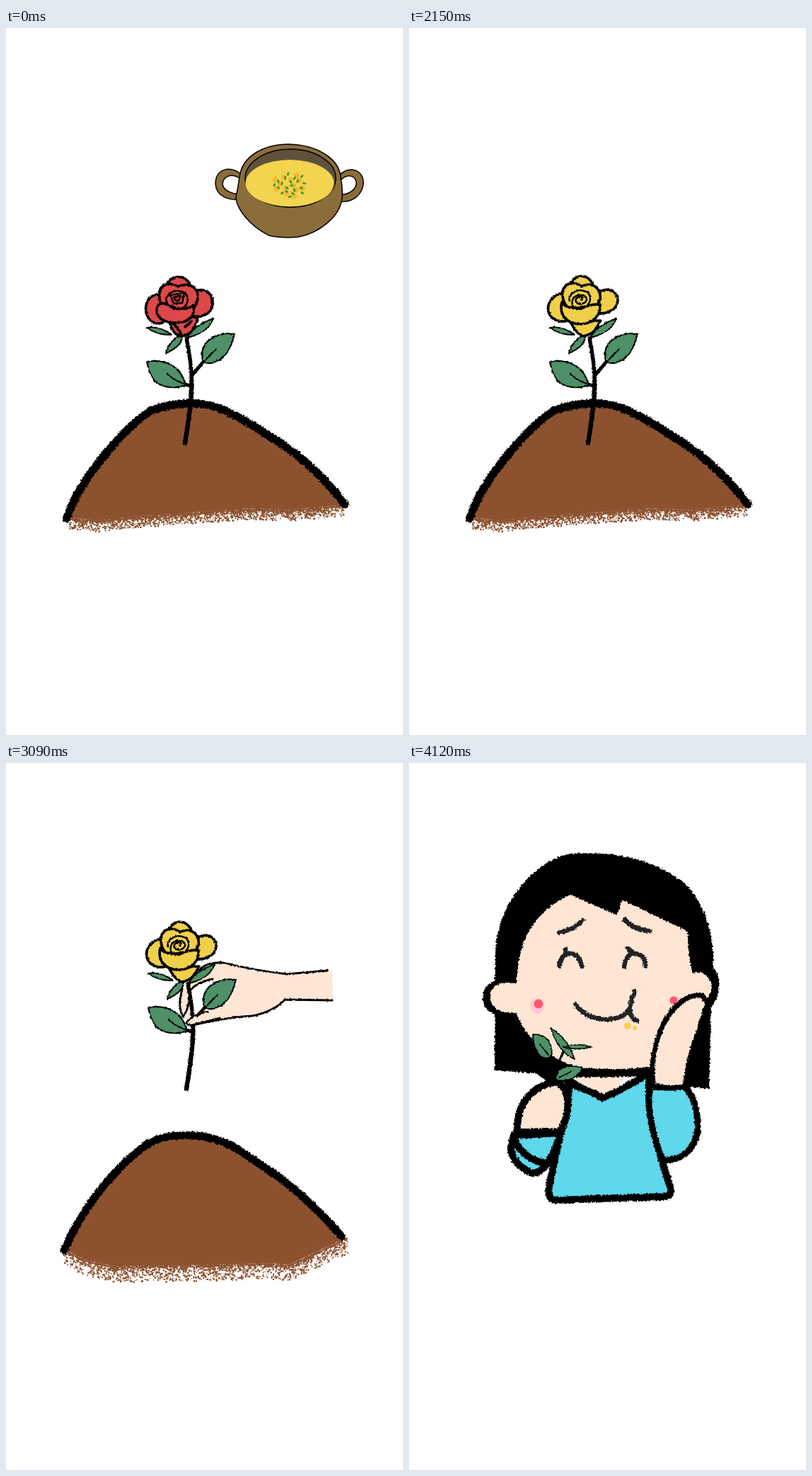
Animation, 561 px wide and 998 px high, one loop 4.55 s. Source, as an HTML page:

```html
<!DOCTYPE html>
<html lang="en">
<head>
<meta charset="utf-8">
<title>Soup rose</title>
<style>
html, body { margin: 0; width: 100%; height: 100%; overflow: hidden; background: #fff; }
svg { display: block; width: 100vw; height: 100vh; }
.ink { fill: none; stroke: #000; stroke-linecap: round; stroke-linejoin: round; }
.line { stroke: #000; stroke-linejoin: round; stroke-linecap: round; }
.green { fill: #4f9068; }
.skin { fill: #ffe6d4; }
.blue { fill: #5fd8ec; }
.soup { fill: #f3d44f; }
.soil { fill: #8c5230; }
</style>
</head>
<body>
<svg viewBox="0 0 561 998">
<defs>
  <filter id="rough" x="-10%" y="-10%" width="120%" height="120%" color-interpolation-filters="sRGB">
    <feTurbulence type="fractalNoise" baseFrequency=".35" numOctaves="2" seed="4"/>
    <feDisplacementMap in="SourceGraphic" scale="5" xChannelSelector="R" yChannelSelector="G"/>
  </filter>
  <filter id="grain" x="-10%" y="-10%" width="120%" height="120%" color-interpolation-filters="sRGB">
    <feTurbulence type="fractalNoise" baseFrequency=".35" numOctaves="2" seed="9"/>
    <feDisplacementMap in="SourceGraphic" scale="3" xChannelSelector="R" yChannelSelector="G"/>
  </filter>
  <g id="stem" class="ink">
    <path stroke-width="5.5" d="M255 438C260 465 264 485 262 522"/>
    <path stroke-width="6.5" d="M262 500Q263 525 253 586"/>
    <path stroke-width="5" d="M264 489L279 471M262 506L250 502"/>
  </g>
  <g id="leaves" class="green line" stroke-width="2">
    <path d="M199 423Q217 420 234 433Q214 434 199 423ZM226 459Q230 441 249 433Q250 449 226 459ZM293 410Q285 431 256 437Q265 420 293 410Z"/>
    <path d="M323 432C300 428 279 440 277 459C276 471 280 474 290 473C312 468 318 450 323 432Z"/>
    <path d="M199 471C222 467 246 474 254 504C240 510 220 508 210 498Q202 488 199 471Z"/>
    <path fill="none" d="M268 484Q285 465 297 453M228 488Q240 501 258 503"/>
  </g>
  <g id="bloom" class="line" fill="currentColor" stroke-width="3.7">
    <path d="M230 412Q236 434 247 435Q266 434 271 408Z"/>
    <path d="M217 376C200 376 196 391 198 402C202 416 212 419 222 416Z"/>
    <path d="M268 371C285 366 293 378 292 390C290 404 276 410 262 406Z"/>
    <path d="M226 367C229 346 258 346 261 367Z"/>
    <path d="M217 375C217 361 232 358 243 365C256 359 272 364 271 380C270 394 262 402 245 404C224 402 215 391 217 375Z"/>
    <path d="M213 401C212 388 222 386 231 392C243 398 258 398 265 391C268 408 256 417 238 416C224 416 214 409 213 401Z"/>
    <path fill="none" d="M236 417Q244 424 248 434M262 414Q256 420 253 422"/>
  </g>
  <g id="gold" class="line" fill="currentColor" stroke-width="3.7">
    <path d="M228 415Q238 434 247 435Q264 432 270 413Z"/>
    <path d="M218 375C206 374 194 388 197 400C200 411 210 415 222 414Z"/>
    <path d="M270 372C284 365 296 374 295 386C293 398 281 404 264 403Z"/>
    <path d="M227 366C231 345 256 345 261 366Z"/>
    <path d="M217 376C216 362 231 355 244 365C256 357 272 366 270 382C266 396 256 403 243 403C226 400 217 390 217 376Z"/>
    <path d="M216 387C219 396 240 397 254 392Q264 389 270 391C271 408 259 418 240 418C222 417 212 404 216 387Z"/>
    <path class="ink" stroke-width="2.6" d="M227 386C224 374 240 366 252 373C262 382 252 397 240 397C228 396 227 381 239 377C251 374 256 386 245 389C236 391 232 383 239 380Q247 377 244 384"/>
  </g>
  <path id="fold" class="ink" stroke-width="2.6" d="M226 382Q231 371 242 371Q257 372 257 384Q254 398 240 397Q227 394 226 382M232 377L252 374L249 388L237 389ZM237 380L247 378L244 385L239 384Z"/>
</defs>

<g data-on="0 5">
  <path class="soil" id="soil1"/>
  <path class="ink" filter="url(#rough)" stroke-width="11.5" d="M86 692Q94 667 110 643Q128 615 150 590Q180 556 205 540Q232 530 262 530Q285 529 310 540Q340 554 370 575Q396 590 420 610Q456 641 479 673"/>
</g>
<g data-on="6 11">
  <path class="soil" id="soil2"/>
  <path class="ink" filter="url(#rough)" stroke-width="11" d="M82 688Q94 660 111 634Q128 607 150 583Q178 552 203 536Q222 526 244 526Q285 523 320 541Q350 560 382 582Q406 599 430 622Q455 646 474 668"/>
</g>

<g data-on="0 11" id="plant">
  <g filter="url(#grain)">
    <g data-on="6 11">
      <path class="skin" d="M459 419L395 424Q350 419 310 409Q285 404 270 419L246 445Q240 470 248 484L262 496Q310 485 345 483Q375 478 392 460L460 461Z"/>
      <path fill="#fff" d="M258 452Q264 437 295 433L277 471L262 483Q262 464 258 452Z"/>
      <path class="ink" stroke-width="2.8" d="M452 419L395 424Q350 419 310 409Q285 404 270 419M247 445Q240 470 248 484Q257 474 257 448Q268 435 290 431M459 461L392 460Q375 478 345 483Q310 485 262 496"/>
    </g>
    <use href="#stem"/>
    <g data-on="6 11">
      <path class="skin" d="M253 494Q260 481 285 477L310 483Q280 492 258 497Z"/>
      <path class="ink" stroke-width="2.8" d="M283 477Q259 482 253 493Q256 498 264 495L300 486"/>
    </g>
    <use href="#leaves"/>
    <g data-on="0 4" color="#de484a"><use href="#bloom"/><use href="#fold"/></g>
    <use href="#gold" data-on="5 11" color="#f0d04b"/>
  </g>
</g>

<g data-on="0 4">
  <g id="pot" stroke="#000" stroke-width="1.5">
    <path fill="#8a6d3b" fill-rule="evenodd" d="M332 206C315 193 296 200 296 220C297 238 315 243 328 242ZM330 212C318 204 306 210 306 221C308 230 320 234 327 234ZM471 208C485 193 506 200 505 220C503 236 490 246 474 245ZM472 216C482 204 496 208 495 221C492 231 484 234 475 235Z"/>
    <path fill="#8a6d3b" d="M330 210C334 180 365 164 400 164C440 165 472 185 473 212Q476 225 475 240C472 268 440 290 413 295Q390 297 372 293C345 280 325 255 325 238Q328 225 330 210Z"/>
    <ellipse cx="402" cy="212" rx="64" ry="41" fill="#5f523c"/>
    <g data-on="0 2" stroke="none">
      <ellipse class="soup" cx="401" cy="219" rx="62.5" ry="33"/>
      <path id="corn" stroke="#f4b92e" stroke-width="7" stroke-linecap="round"/>
      <path id="herbs" stroke="#3c9230" stroke-width="2.6" stroke-linecap="round"/>
    </g>
  </g>
  <g class="soup">
    <path data-on="2 2" d="M332 222C320 255 310 285 307 307Q312 313 318 308C325 285 335 272 350 264L365 240Z"/>
    <path data-on="3 3" d="M332 236C322 270 308 310 305 342Q311 349 318 342C328 310 350 290 375 274C402 260 420 238 428 212Q380 205 332 236Z"/>
    <path data-on="4 4" d="M336 251Q360 243 391 264C365 285 330 330 315 379Q309 386 303 379C305 340 322 280 336 251Z"/>
  </g>
</g>

<g data-on="12 13">
  <g filter="url(#rough)">
    <path d="M121 434L122 270C124 195 180 137 228 128C300 124 350 138 392 172C422 205 431 245 430 290Q440 300 438 318Q435 338 427 344L424 460L385 456L340 440L232 452L195 450L180 438Z"/>
    <circle cx="129" cy="331" r="25"/>
    <path class="skin" d="M152 311C154 265 165 215 228 186L294 215L301 193L394 238Q394 275 401 297Q418 290 428 312Q428 335 404 343Q385 400 340 430Q290 434 242 430Q175 412 151 352Q137 354 125 349Q113 340 115 324Q122 306 152 311Z"/>
    <path class="skin" d="M228 444L310 442L277 470Z"/>
    <path class="ink" stroke="#222" stroke-width="10" d="M244 437Q290 441 334 434"/>
    <g class="ink" style="stroke:#222" stroke-width="6.5">
      <path d="M213 239Q233 236 245 222M305 221Q318 236 340 237"/>
      <path d="M212 287Q215 269 228 269Q241 270 244 287M222 269L221 263M304 287Q307 269 320 269Q333 270 334 286M309 261L315 267"/>
      <path data-on="13 13" d="M235 340C250 365 295 370 312 348M319 322Q312 340 312 352Q314 360 322 364"/>
    </g>
    <path data-on="12 12" class="line" fill="#d9525c" stroke-width="6" d="M235 340Q275 356 315 334Q312 375 276 378Q246 374 235 340Z"/>
  </g>
  <ellipse cx="181" cy="343" rx="10" ry="11" fill="#ffc9d2"/>
  <ellipse cx="375" cy="336" rx="8" ry="7" fill="#ffc9d2"/>
  <g fill="#ff5a6c"><circle cx="183" cy="340" r="6.5"/><circle cx="374" cy="335" r="5.5"/></g>
  <g data-on="13 13" class="soup"><circle cx="309" cy="371" r="5"/><circle cx="319" cy="374" r="3"/></g>

  <g class="line" stroke-width="10" filter="url(#rough)">
    <g data-on="12 12">
      <path class="skin" d="M408 535C400 560 415 574 432 573C450 570 460 550 454 532Q445 518 428 518Z"/>
      <path class="blue" d="M342 448C385 452 425 485 437 520Q420 535 400 540Q380 520 350 508Z"/>
    </g>
    <path class="blue" d="M225 452Q250 460 274 473Q300 462 340 437Q335 495 357 560L370 602Q371 611 362 612L208 617Q195 617 198 597L216 515Q228 480 225 452Z"/>
    <path class="skin" d="M153 521C151 480 176 455 208 450C228 460 230 492 213 521Z"/>
    <path class="blue" d="M148 526L214 522Q204 560 185 576Q177 581 169 577C150 566 143 552 144 541Z"/>
    <path fill="none" d="M149 533Q164 560 188 563"/>
  </g>
  <g data-on="13 13" filter="url(#rough)">
    <path class="blue line" stroke-width="9" d="M340 455Q365 461 388 456C405 470 408 495 408 515C406 542 388 563 358 560C342 520 336 485 340 455Z"/>
    <path class="skin" d="M345 453C338 400 365 335 405 328C421 325 421 335 416 345C405 385 392 405 387 455Q365 459 345 453Z"/>
    <path class="ink" stroke-width="7" d="M345 452C338 400 365 335 405 328Q416 326 418 334M342 454Q365 461 388 457"/>
  </g>
</g>
<g data-on="12 13" filter="url(#grain)">
  <path class="ink" stroke-width="3.5" d="M197 448Q212 425 221 400"/>
  <g class="green line" stroke-width="1.6">
    <path d="M175 383Q202 382 202 412Q196 420 186 414Q175 403 175 383ZM246 430Q232 453 208 447Q208 422 246 430Z"/>
    <path d="M200 374Q225 389 234 418Q212 409 200 374ZM218 401Q238 394 258 401Q236 406 218 401Z"/>
    <path fill="none" d="M185 397L197 412M230 435L212 444"/>
  </g>
  <use href="#gold" data-on="12 12" color="#f0d04b" transform="translate(242 370) rotate(25) scale(.72) translate(-245 -392)"/>
</g>
</svg>
<script>
const $ = id => document.getElementById(id);
let seed = 7;
const rnd = () => (seed = seed * 16807 % 2147483647) / 2147483647;

// Solid soil above a ragged edge, with grains thinning out below it.
function soil(id, top, edge, depth) {
  let d = top + edge.map(p => 'L' + p).reverse().join('') + 'Z';
  const left = edge[0][0], right = edge[edge.length - 1][0];
  for (let i = 0; i < 2600; i++) {
    const x = left + rnd() * (right - left);
    const k = edge.findIndex(p => p[0] > x);
    const [x0, y0] = edge[k - 1], [x1, y1] = edge[k];
    const y = y0 + (y1 - y0) * (x - x0) / (x1 - x0) + depth * rnd() ** 3 - 1;
    const s = 1 + rnd() * 1.6;
    d += `M${x.toFixed(1)} ${y.toFixed(1)}v${s.toFixed(1)}h${s.toFixed(1)}v-${s.toFixed(1)}z`;
  }
  $(id).setAttribute('d', d);
}
soil('soil1', 'M87 692Q94 667 110 643Q150 580 205 540Q262 520 312 541Q410 595 476 674',
  [[89, 692], [125, 696], [190, 690], [260, 685], [340, 679], [400, 681], [476, 674]], 15);
soil('soil2', 'M82 688Q94 660 111 634Q150 573 203 536Q262 515 320 541Q400 590 480 670',
  [[82, 688], [110, 702], [150, 711], [250, 710], [370, 707], [400, 709], [440, 690], [482, 670]], 22);

function sprinkle(id, count, len) {
  let d = '';
  for (let i = 0; i < count; i++) {
    const a = i * 2.4, r = Math.sqrt((i + .5) / count);
    const x = 401 + 24 * r * Math.cos(a), y = 222 + 17 * r * Math.sin(a), b = rnd() * 6.28;
    d += `M${x} ${y}l${len * Math.cos(b)} ${len * Math.sin(b)}`;
  }
  $(id).setAttribute('d', d);
}
sprinkle('corn', 13, 1);
sprinkle('herbs', 20, 2.5);

const LOOP = 4550;
const cuts = [0, 430, 860, 1290, 1720, 2150, 2580, 2750, 2920, 3090, 3260, 3430, 3600, 4120];
const tilt = [[0, 0, 0], [-4, 1, -15], [-10, 1, -31], [-9, 2, -55], [-9, 2, -55]];
const lift = [[0, 0], [-2, -16], [0, -65], [2, -126], [4, -177], [6, -211]];
const parts = [...document.querySelectorAll('[data-on]')].map(el => [el, ...el.dataset.on.split(' ').map(Number)]);
let shown = -1;

function draw(now) {
  const t = now % LOOP;
  const step = cuts.filter(c => c <= t).length - 1;
  if (step === shown) return;
  shown = step;
  for (const [el, from, to] of parts) el.style.display = step >= from && step <= to ? '' : 'none';
  const [px, py, angle] = tilt[step] || tilt[0];
  $('pot').setAttribute('transform', `translate(${px} ${py}) rotate(${angle} 400 230)`);
  $('plant').setAttribute('transform', `translate(${lift[step - 6] || [0, 0]})`);
}
let start;
function tick(now) {
  start ??= now;
  draw(now - start);
  requestAnimationFrame(tick);
}
draw(0);
requestAnimationFrame(tick);
</script>
</body>
</html>
```
